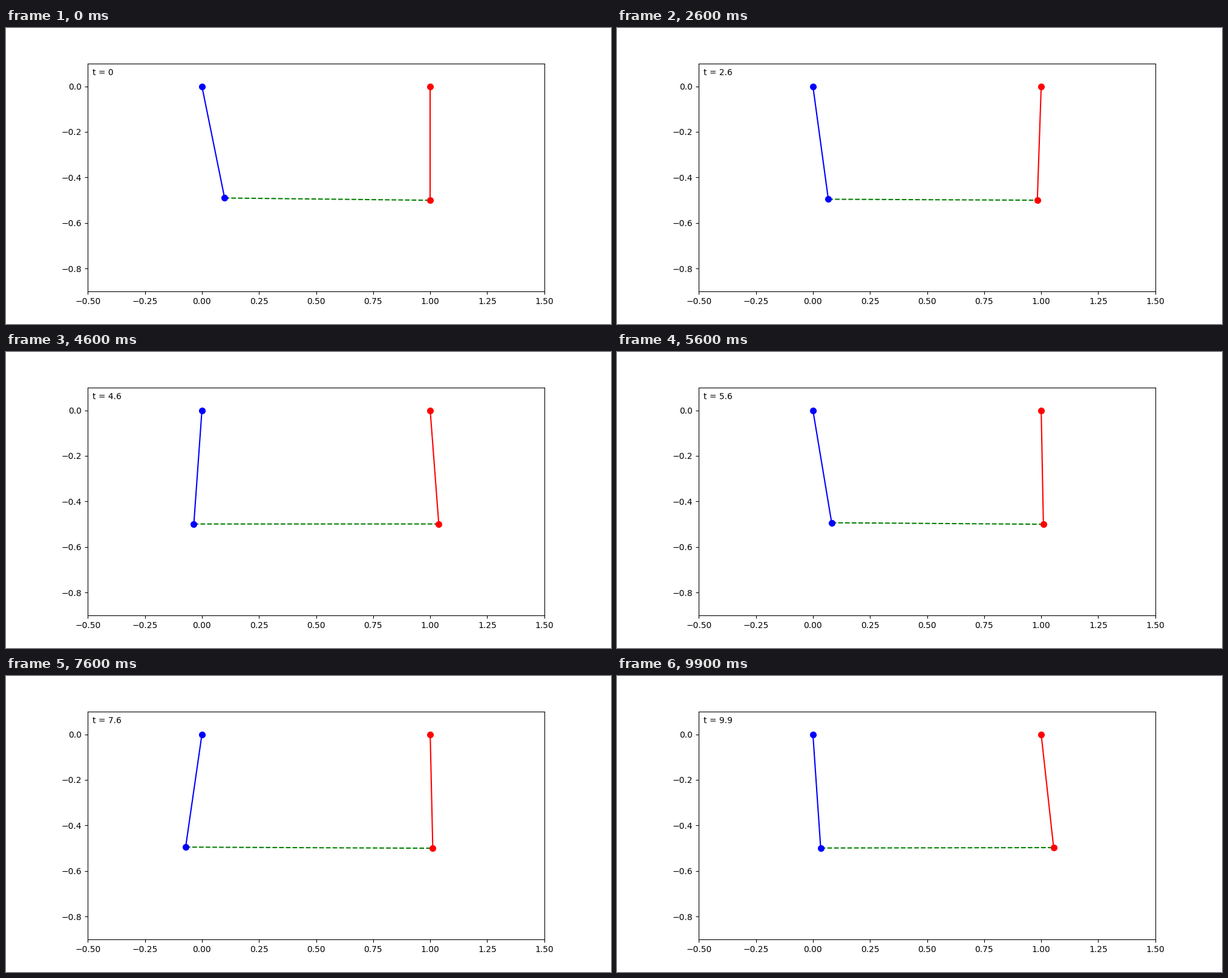
A matplotlib script that plays this animation: 1000x490 px, repeating every 10000 ms.

```python
import numpy as np
import matplotlib.pyplot as plt
from matplotlib.animation import FuncAnimation

G, LENGTH, K = 9.81, 0.5, 1.0
MASS = np.array([1.0, 1.2])
PIVOTS = (0.0, 1.0)
FRAMES, DT, SUBSTEPS = 100, 0.1, 20


def deriv(state):
    """Two pendulums joined by a spring; state holds angles, then speeds."""
    angle, speed = state
    stretch = LENGTH * (np.sin(angle[1]) - np.sin(angle[0]))
    pull = K * stretch * np.array([1.0, -1.0]) * np.cos(angle)
    return np.array([speed, -G / LENGTH * np.sin(angle) + pull / (MASS * LENGTH)])


def rk4(state, h):
    a = deriv(state)
    b = deriv(state + h / 2 * a)
    c = deriv(state + h / 2 * b)
    d = deriv(state + h * c)
    return state + h / 6 * (a + 2 * b + 2 * c + d)


def solve():
    state = np.array([[0.2, 0.0], [0.0, 0.0]])
    angles = []
    for _ in range(FRAMES):
        angles.append(state[0])
        for _ in range(SUBSTEPS):
            state = rk4(state, DT / SUBSTEPS)
    return np.array(angles)


angles = solve()

plt.rcParams["font.family"] = "DejaVu Sans"
fig, ax = plt.subplots(figsize=(10, 4.9), dpi=100)
ax.set_aspect("equal")
ax.set_xlim(-0.5, 1.5)
ax.set_ylim(-0.9, 0.1)

spring, = ax.plot([], [], "--", color="green", lw=1.5)
rods = [ax.plot([], [], "o-", color=c, lw=1.5, ms=7)[0] for c in ("blue", "red")]
label = ax.text(0.01, 0.95, "", transform=ax.transAxes)


def update(i):
    bob_x = PIVOTS + LENGTH * np.sin(angles[i])
    bob_y = -LENGTH * np.cos(angles[i])
    for rod, pivot, x, y in zip(rods, PIVOTS, bob_x, bob_y):
        rod.set_data([pivot, x], [0, y])
    spring.set_data(bob_x, bob_y)
    label.set_text(f"t = {i * DT:.2g}")
    return [spring, *rods, label]


anim = FuncAnimation(fig, update, frames=FRAMES, interval=100,
                     repeat=True, repeat_delay=0)
plt.show()
```
